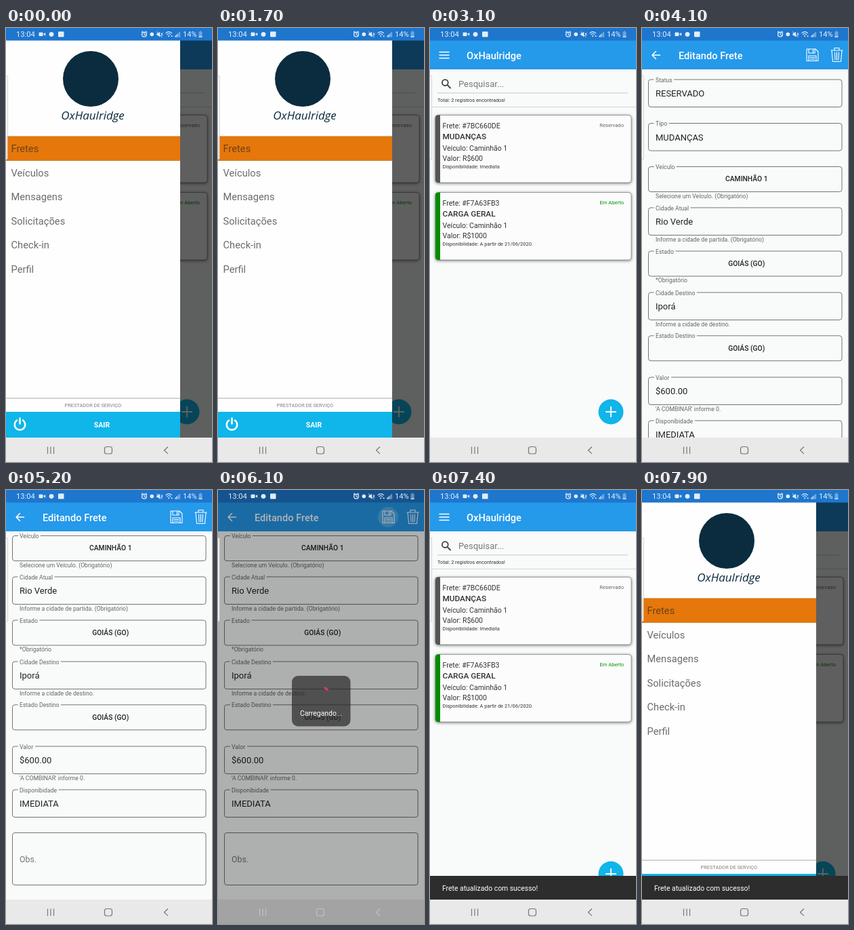
Recreate the animation shown at these times as an HTML page. Size 304x640 px, loop 8000 ms.

```html
<!DOCTYPE html>
<html lang="pt-BR">
<head>
<meta charset="utf-8">
<title>Fretes</title>
<style>
  html, body { margin: 0; width: 100%; height: 100%; overflow: hidden; background: #fafafa; }
  svg { display: block; width: 100vw; height: 100vh; font-family: Roboto, sans-serif; }
  text { white-space: pre; }
  .line { fill: none; stroke: #fff; stroke-width: 1.5; stroke-linecap: round; stroke-linejoin: round; }
  .card { filter: drop-shadow(0 1px 2px rgba(0, 0, 0, .5)); }
  .label { paint-order: stroke; stroke: #f9fafa; stroke-width: 6px; }
</style>
</head>
<body>
<svg id="stage" viewBox="0 0 304 640"></svg>
<script>
const LOOP = 8000;
const BRAND = "OxHaulridge";
const BLUE = "#2599ea", CYAN = "#10b5e9", PAPER = "#f9fafa";
const stage = document.getElementById("stage");

// Markup helpers
const rect = (x, y, w, h, fill, more = "") =>
  `<rect x="${x}" y="${y}" width="${w}" height="${h}" fill="${fill}" ${more}/>`;
const circle = (x, y, r, fill, more = "") =>
  `<circle cx="${x}" cy="${y}" r="${r}" fill="${fill}" ${more}/>`;
const text = (x, y, size, fill, str, more = "") =>
  `<text x="${x}" y="${y}" font-size="${size}" fill="${fill}" ${more}>${str}</text>`;
const line = (d, more = "") => `<path class="line" d="${d}" ${more}/>`;
const group = (id, body, more = "") => `<g id="${id}" ${more}>${body}</g>`;
const MID = 'text-anchor="middle"', MEDIUM = 'font-weight="500"';

const toolbar = title =>
  rect(0, 18, 304, 43, BLUE) + text(54, 45.5, 14.6, "#fff", title, MEDIUM);

// Freight list
function card(y, c) {
  const row = (dy, str, size = 10.5, more = "") => text(18.5, y + dy, size, "#333", str, more);
  return `<g class="card">${rect(8, y, 289, 99.5, "#fcfcfc", 'rx="4" stroke="#777" stroke-width=".7"')}</g>
    <path d="M15 ${y}h-3q-4 0-4 4v91.5q0 4 4 4h3z" fill="${c.edge}"/>` +
    row(19.5, "Frete: #" + c.code) +
    row(35.5, c.kind, 11.8, MEDIUM) +
    row(52, "Veículo: Caminhão 1") +
    row(67, "Valor: R$" + c.price) +
    row(78.5, "Disponibilidade: " + c.when, 7.5) +
    text(286, y + 17.6, 7.6, c.tint, c.state, 'text-anchor="end"');
}

const listPage = rect(0, 18, 304, 586, PAPER) + toolbar(BRAND) +
  line("M14 35.5h14M14 40h14M14 44.5h14", 'stroke-linecap="butt"') +
  `<g fill="none" stroke="#444" stroke-width="1.8"><circle cx="22.3" cy="80.6" r="4.4"/><path d="M25.6 84l5 5"/></g>` +
  text(42, 87, 13, "#777", "Pesquisar...") +
  rect(11, 95.5, 281, .8, "#bbb") +
  text(11, 109, 7.4, "#333", "Total: 2 registros encontrados!") +
  rect(0, 116, 304, .8, "#ccc") +
  card(128.5, { edge: "#555", code: "7BC660DE", kind: "MUDANÇAS", price: 600,
    when: "Imediata", state: "Reservado", tint: "#666" }) +
  card(242.5, { edge: "#008c00", code: "F7A63FB3", kind: "CARGA GERAL", price: 1000,
    when: "A partir de 21/06/2020.", state: "Em Aberto", tint: "#009000" }) +
  circle(267, 566, 18.5, CYAN) +
  line("M259 566h16M267 558v16", 'style="stroke-width:1.8;stroke-linecap:butt"');

// Edit form
const fields = [
  { y: 76, label: "Status", value: "RESERVADO" },
  { y: 140.5, label: "Tipo", value: "MUDANÇAS" },
  { y: 204.5, label: "Veículo", pick: "CAMINHÃO 1", hint: "Selecione um Veículo. (Obrigatório)" },
  { y: 265, label: "Cidade Atual", value: "Rio Verde", hint: "Informe a cidade de partida. (Obrigatório)" },
  { y: 329, label: "Estado", pick: "GOIÁS (GO)", hint: "*Obrigatório" },
  { y: 390, label: "Cidade Destino", value: "Iporá", hint: "Informe a cidade de destino." },
  { y: 453.8, label: "Estado Destino", pick: "GOIÁS (GO)" },
  { y: 515, label: "Valor", value: "$600.00", hint: "'A COMBINAR' informe 0." },
  { y: 579, label: "Disponibidade", value: "IMEDIATA" }
];

function field({ y, label, value, pick, hint }) {
  const h = pick ? 37 : 40.5;
  return rect(9.5, y, 285.5, h, "none", 'rx="3.5" stroke="#666" stroke-width=".9"') +
    text(20, y + 3.6, 8.7, "#666", label, 'class="label"') +
    (pick ? text(154.3, y + 21.7, 10.3, "#222", pick, `${MID} ${MEDIUM}`)
          : text(20, y + 25, 13, "#222", value)) +
    (hint ? text(20, y + h + 9.3, 8.7, "#666", hint) : "");
}

const saveIcon = line("M243 31h13l4 4v13.5h-17zM246 31v6h9v-6M252.5 32v4M246 48v-7h11v7M248 43.5h7M248 46h7",
  'style="stroke-width:1.1"');
const trashIcon = line("M279 33h17M284 32.5v-3h7v3M280 33.5l1.5 16h12l1.5-16M284.5 36l.6 11M287.5 36v11M290.5 36l-.6 11",
  'style="stroke-width:1.1"');

const editPage = rect(0, 18, 304, 586, PAPER) +
  group("form", fields.map(field).join("") +
    rect(9.5, 642.5, 285.5, 77, "none", 'rx="3.5" stroke="#666" stroke-width=".9"') +
    text(20, 686, 12.4, "#777", "Obs.")) +
  toolbar("Editando Frete") +
  line("M26.5 40h-11M20.5 34.5l-5.5 5.5l5.5 5.5") +
  circle(251, 40, 15, "#fff", 'id="ripple"') + saveIcon + trashIcon;

// Side menu
const items = ["Fretes", "Veículos", "Mensagens", "Solicitações", "Check-in", "Perfil"];
const menu = rect(0, 18, 257, 586, "#fefefe") +
  circle(125, 75, 41, "#0b2c3e") +
  text(128, 134.5, 17, "#0b2c3e", BRAND, `${MID} font-style="italic" style="font-family:'Open Sans',sans-serif"`) +
  rect(0, 160, 257, 35.5, "#e5770b") +
  rect(0, 159.5, 257, .7, "#c9741f") + rect(0, 195, 257, .7, "#c9741f") +
  items.map((s, i) => text(7.5, 183.3 + i * 35.5, 14.7, i ? "#6c6c6c" : "#6f4216", s)).join("") +
  rect(0, 545.5, 257, 1, "#aaa") +
  text(128.3, 558.6, 7.4, "#808080", "PRESTADOR DE SERVIÇO", MID) +
  rect(0, 566, 257, 38, CYAN) +
  line("M16 578.5a7.8 7.8 0 1 0 9 0M20.5 575.5v8", 'style="stroke-width:2.6"') +
  text(141.5, 588.7, 10.5, "#fff", "SAIR", `${MID} font-weight="700"`);

const toast = rect(0, 569, 304, 35, "#2d2d2d") +
  text(18, 590.5, 10.4, "#fff", "Frete atualizado com sucesso!");

const navIcons = `<g id="nav" fill="none" stroke-width="1.2">
  <path d="M61.5 617.5v10.5M66 617.5v10.5M70.5 617.5v10.5M239 617.5l-5.5 5.2l5.5 5.2"/>
  <rect x="145.5" y="617.5" width="11" height="10.5" rx="3"/></g>`;

const statusIcons = `<g opacity=".88">` + text(15, 13.2, 11.2, "#fff", "13:04") +
  rect(48.5, 6.5, 6, 5.5, "#fff", 'rx="1"') + `<path d="M55 9l3.2-2.3v5z" fill="#fff"/>` +
  circle(67, 9.3, 3.4, "#fff") + rect(77, 5.3, 8.5, 8, "#fff", 'rx="1"') +
  line("M204 6.7v2.8l1.8 1M200.2 6.2l1.6-1.4M207.8 6.2l-1.6-1.4", 'style="stroke-width:1.1"') +
  circle(204, 9.5, 3.4, "none", 'stroke="#fff" stroke-width="1.3"') +
  circle(215.3, 9.3, 2.8, "#fff") +
  `<path d="M222.5 7.8h2l2.6-2.4v8l-2.6-2.4h-2z" fill="#fff"/>` +
  line("M222.5 5.5l7.5 8M229 7.5l2 3.5M231 7.5l-2 3.5", 'style="stroke-width:.9"') +
  line("M235.8 7.4q4.4-3.6 8.8 0M237.5 9.6q2.7-2.2 5.4 0", 'style="stroke-width:1.1"') +
  circle(240.2, 12, 1.1, "#fff") + circle(244.6, 12, 1, "#fff") +
  [0, 1, 2, 3].map(i =>
    rect(249.5 + i * 2, 11 - i * 1.7, 1.3, 2.5 + i * 1.7, "#fff", `opacity="${i > 1 ? .6 : 1}"`)).join("") +
  text(261, 13.2, 11.2, "#fff", "14%") +
  rect(284.5, 5.5, 5, 8.2, "#fff", 'opacity=".4" rx=".8"') +
  rect(286, 4.3, 2, 1.2, "#fff", 'opacity=".4"') + rect(284.5, 12, 5, 1.7, "#fff", 'opacity=".7"') + `</g>`;

stage.innerHTML = listPage + group("edit", editPage) +
  rect(0, 18, 304, 586, "#000", 'id="shade"') +
  group("menu", menu) + group("toast", toast) +
  rect(0, 0, 304, 18.5, "#1e76cd") + rect(0, 604, 304, 36, "#e9e9e9") +
  rect(0, 0, 304, 640, "#000", 'id="dim"') + navIcons +
  group("loader", rect(109, 274, 86.5, 74.5, "#282828", 'rx="9" opacity=".7"') +
    `<path id="arc" fill="none" stroke="#f02c72" stroke-width="3"/>` +
    text(152, 333, 10.4, "#fff", "Carregando...", MID)) +
  statusIcons +
  rect(-4, 70.5, 6.6, 123.5, "#fff", 'rx="2" opacity=".8" stroke="#aaa" stroke-width=".7"');

const $ = id => document.getElementById(id);
const set = (id, props) => {
  for (const k in props) $(id).setAttribute(k, props[k]);
};
const ramp = (t, a, b) => Math.min(1, Math.max(0, (t - a) / (b - a)));
const smooth = p => .5 - .5 * Math.cos(Math.PI * p);
const easeOut = p => 1 - (1 - p) ** 3;

function arcPath(start, sweep) {
  const at = deg => {
    const a = deg * Math.PI / 180;
    return `${152 + 13.5 * Math.cos(a)} ${304 + 13.5 * Math.sin(a)}`;
  };
  return `M${at(start)}A13.5 13.5 0 ${sweep > 180 ? 1 : 0} 1 ${at(start + sweep)}`;
}

function draw(t) {
  const open = 1 - smooth(ramp(t, 2376, 2700)) + easeOut(ramp(t, 7450, 7850));
  set("menu", { transform: `translate(${-257 * (1 - open)} 0)` });
  set("shade", { opacity: .62 * open ** .6 });

  const page = easeOut(ramp(t, 3350, 3630)) * (1 - smooth(ramp(t, 6600, 6800)));
  set("edit", { opacity: page, transform: `translate(0 ${40 * (1 - page)})` });
  set("form", { transform: `translate(0 ${-137 * smooth(ramp(t, 4400, 5000))})` });
  set("ripple", { opacity: .2 * ramp(t, 5800, 6000) * (1 - ramp(t, 6200, 6450)) });

  const up = easeOut(ramp(t, 6620, 6850));
  set("toast", { transform: `translate(0 ${36 * (1 - up)})` });

  const dim = .6 * ramp(t, 5900, 6300) * (1 - ramp(t, 6860, 7260));
  set("dim", { opacity: dim });
  set("nav", { stroke: dim > .2 ? "#c2c2c2" : "#777" });
  set("loader", { opacity: ramp(t, 5950, 6100) * (1 - .6 * ramp(t, 6820, 6900)) * (1 - ramp(t, 6900, 7150)) });

  const spin = t - 6100;
  set("arc", { d: arcPath(-70 + spin * 375 / 800, 155 - 125 * Math.cos(Math.PI * spin / 800)) });
}

function tick() {
  draw(performance.now() % LOOP);
  requestAnimationFrame(tick);
}
tick();
</script>
</body>
</html>
```
